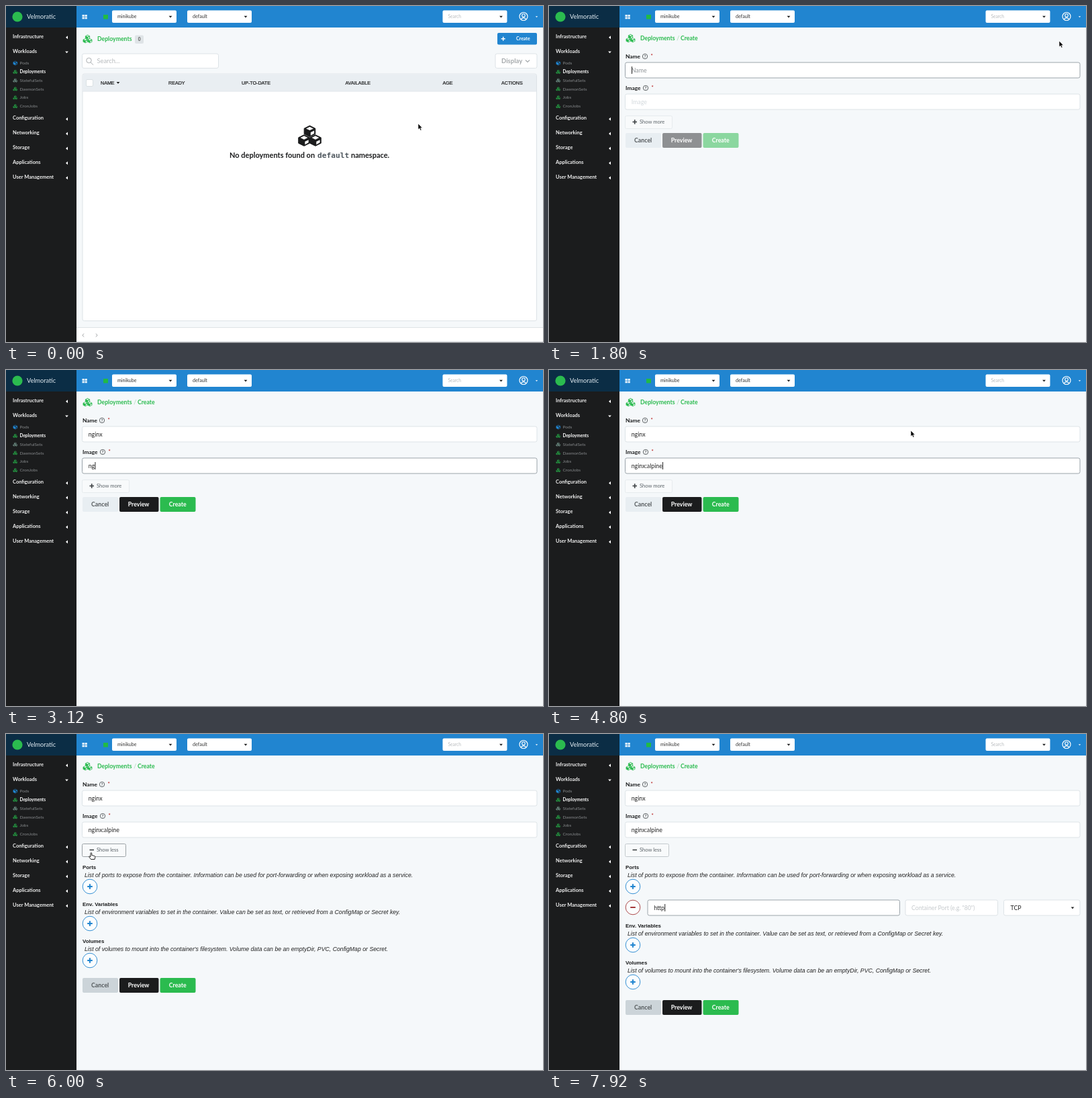
These frames come from a looping animation (800x500 px, 8 s). An HTML page:

```html
<!DOCTYPE html>
<html lang="en">
<head>
<meta charset="utf-8">
<title>Deployments</title>
<style>
  html, body { margin: 0; width: 100%; height: 100%; overflow: hidden; background: #f5f8fa; }
  svg { display: block; width: 800px; height: 500px; }
  text { font-family: Lato, sans-serif; white-space: pre; }
  .sans { font-family: "Liberation Sans", Arial, sans-serif; }
  .mono { font-family: "DejaVu Sans Mono", monospace; }
  .b { font-weight: 700; }
  .i { font-style: italic; }
</style>
</head>
<body>
<svg id="stage" viewBox="0 0 800 500" xmlns="http://www.w3.org/2000/svg"></svg>
<script>
const BLUE = '#2185d0', GREEN = '#2bbb4f', INK = '#1b1c1d';
const LOOP = 8000, STEP = 120;

// drawing helpers; text is placed by its vertical centre
const text = (x, y, str, size, fill = INK, cls = '', extra = '') =>
  `<text x="${x}" y="${(y + size * .35).toFixed(2)}" font-size="${size}" fill="${fill}" class="${cls}" ${extra}>${str}</text>`;
const rect = (x, y, w, h, fill, r = 0, extra = '') =>
  `<rect x="${x}" y="${y}" width="${w}" height="${h}" rx="${r}" fill="${fill}" ${extra}/>`;
const box = (x, y, w, h, extra = '') => rect(x + .5, y + .5, w - 1, h - 1, '#fff', 2.5, `stroke="#dde3e7" ${extra}`);
const path = (d, fill, extra = '') => `<path d="${d}" fill="${fill}" ${extra}/>`;
const line = (d, color, w = 1) => path(d, 'none', `stroke="${color}" stroke-width="${w}"`);
const group = (id, body) => `<g id="${id}">${body}</g>`;
const down = (x, y, color = INK, s = 2.4) => path(`M${x - s} ${y - s / 2}h${2 * s}l${-s} ${s * 1.1}z`, color);
const plus = (x, y, s, color, w) => line(`M${x - s} ${y}h${2 * s}M${x} ${y - s}v${2 * s}`, color, w);

function cube(x, y, s, color, gap) {
  const h = s * .5;
  return path(`M${x} ${y - s}L${x + s} ${y - h}V${y + h}L${x} ${y + s}L${x - s} ${y + h}V${y - h}z`, color,
      `stroke="${color}" stroke-width="${s * .12}" stroke-linejoin="round"`) +
    path(`M${x} ${y - s * .8}l${s * .66} ${s * .32}l${-s * .66} ${s * .32}l${-s * .66} ${-s * .32}z`, gap) +
    path(`M${x + s * .16} ${y + s * .2}l${s * .64} ${-s * .3}v${s * .5}l${-s * .64} ${s * .36}z`, gap);
}
const cubes = (x, y, s, color, gap) =>
  cube(x, y - s * .82, s, color, gap) + cube(x - s * 1.02, y + s * .82, s, color, gap) + cube(x + s * 1.02, y + s * .82, s, color, gap);

function sidebar() {
  let out = rect(0, 0, 105, 500, INK) + rect(0, 0, 105, 32, '#0b2d45') +
    `<circle cx="17" cy="16" r="7.6" fill="${GREEN}"/>` + text(31, 15.5, 'Velmoratic', 9.2, '#e4edf3');
  const heads = [['Infrastructure', 45], ['Workloads', 67], ['Configuration', 166.5], ['Networking', 188.3],
    ['Storage', 210.2], ['Applications', 232], ['User Management', 254]];
  for (const [name, y] of heads) {
    out += text(10, y, name, 7.5, '#f0f0f0', 'b');
    out += name === 'Workloads' ? down(90.5, y + 1.7, '#fff') : path(`M92 ${y - .8}v5l-3 -2.5z`, '#fff');
  }
  ['Pods', 'Deployments', 'StatefulSets', 'DaemonSets', 'Jobs', 'CronJobs'].forEach((name, i) => {
    const y = 85 + i * 12.8, on = i === 1;
    out += i ? cubes(13.8, y, 1.6, i === 2 ? '#6f8f86' : '#27a046', INK) : cube(13.8, y, 3, BLUE, INK);
    out += text(20.5, y, name, 6.5, on ? '#fff' : '#85888a', on ? 'b' : '');
  });
  return out;
}

function topbar() {
  let out = rect(105, 0, 695, 32, BLUE);
  for (const x of [113.5, 117.5]) for (const y of [13, 16.5]) out += rect(x, y, 3.3, 2.8, '#e8f3fb');
  out += rect(145, 13, 7, 6.5, '#21ba45');
  for (const [x, label, color] of [[158, 'minikube', '#333'], [270, 'default', '#333'], [650.5, 'Search', '#b8bcbf']])
    out += rect(x, 6.5, 96, 18.5, '#fff', 2) + text(x + 8, 16, label, label === 'Search' ? 6.6 : 7.1, color) + down(x + 87, 16);
  out += `<circle cx="771" cy="15.5" r="6" fill="none" stroke="#fff" stroke-width="1.2"/>
    <circle cx="771" cy="14" r="2.3" fill="none" stroke="#fff" stroke-width="1.1"/>`;
  return out + line('M767 19.6q4 -4 8 0', '#fff', 1.1) + down(790.5, 16, '#fff', 1.7);
}

function listPage() {
  let out = cubes(121.5, 49, 3.3, GREEN, '#f5f8fa') + text(136, 49.3, 'Deployments', 8.7, GREEN, 'b') +
    rect(192, 43.5, 13, 12.5, '#dfe4e7', 2) + text(196.7, 49.8, '0', 6.6, '#555', 'b');
  out += rect(732, 40, 59, 17.5, BLUE, 2) + group('hover', path('M749.500 40H734q-2 0 -2 2v13.500q0 2 2 2h15.500z', '#1c5d91')) +
    plus(740.7, 48.8, 3, '#fff', 1.5) + text(760, 49, 'Create', 7, '#fff', 'b');
  out += box(113, 70.5, 204, 22.5) + `<circle cx="123.500" cy="81" r="3.700" fill="none" stroke="#a9adb0"/>` +
    line('M126.200 83.800l3.800 4', '#a9adb0') + text(135.5, 81.7, 'Search...', 9.3, '#b5b9bc');
  out += box(728.5, 70.5, 63, 22.5) + text(738, 81.7, 'Display', 9.5, '#a4a8ab', 'b') + line('M774 80.500l3 3l3 -3', '#a4a8ab', 1.2);
  out += box(113.5, 100.5, 677.5, 368.5) + rect(114.5, 101.5, 675.5, 25.5, '#e9eef2') + line('M114 127h676', '#dde3e7', .8) +
    rect(119.5, 109.5, 10, 10, '#fff', 1.5, 'stroke="#d4dade" stroke-width=".8"');
  for (const [x, label] of [[141, 'NAME'], [242, 'READY'], [351, 'UP-TO-DATE'], [505.5, 'AVAILABLE'], [650.5, 'AGE'], [738, 'ACTIONS']])
    out += text(x, 114.2, label, 7.15, INK, 'sans', `stroke="${INK}" stroke-width=".2"`);
  out += down(167, 114.3) + cubes(452.5, 193.2, 8.3, INK, '#fff');
  out += text(333, 222, 'No deployments found on', 11, INK, 'b') + text(464, 222, 'default', 11.2, '#4d565d', 'mono b') +
    text(514, 222, 'namespace.', 11, INK, 'b');
  out += rect(105, 478.5, 695, 21.5, '#fff') + line('M105 478.500h695M105 499.500h695', '#dfe3e6') +
    line('M116 487.500l-2 2.500l2 2.500M134 487.500l2 2.500l-2 2.500', '#8d9194', .8);
  return out;
}

function field(id, x, y, w) {
  return box(x, y, w, 24, `id="${id}Box"`) + text(x + 9.7, y + 12, '', 8.8, INK, '', `id="${id}Text"`) +
    rect(x + 10, y + 6.5, .9, 11, '#111', 0, `id="${id}Caret"`);
}

function label(name, y, x) {
  return text(114, y, name, 8.4, INK, 'b') + `<circle cx="${x}" cy="${y}" r="3.700" fill="none" stroke="#3d4245" stroke-width=".8"/>` +
    text(x, y, '?', 5.8, '#3d4245', 'b', 'text-anchor="middle"') + text(x + 8.5, y - 1, '*', 7.5, '#b82424', 'b');
}

const ring = (y, color) => `<circle cx="125" cy="${y}" r="10.800" fill="#fbfdfe" stroke="${color}" stroke-width=".9"/>`;
const section = (y, name, info) => text(114, y, name, 7.9, INK, 'sans b') + text(117, y + 11.9, info, 8.73, '#222', 'sans i') +
  ring(y + 29, BLUE) + plus(125, y + 29, 3.8, BLUE, 2);

function formPage() {
  let out = cubes(121.5, 48, 3.3, GREEN, '#f5f8fa') + text(136, 48.3, 'Deployments', 8.7, GREEN, 'b') +
    text(190.3, 48.3, '/', 8.7, '#9fd8ae') + text(196, 48.3, 'Create', 8.7, GREEN, 'b');
  out += label('Name', 75, 143) + field('name', 113, 83.5, 678.5) + label('Image', 122, 144) + field('image', 113, 130.5, 678.5);
  out += group('toggle', rect(113.5, 163.5, 70, 19, '#f8fafb', 2, 'id="toggleBox"') +
    line('M124.500 172.500h6.500', '#3d4245', 1.6) + group('toggleBar', line('M127.750 169.200v6.600', '#3d4245', 1.6)) +
    text(135, 172.7, '', 7.55, '#5b6368', '', 'id="toggleText"'));
  out += group('more', section(198, 'Ports', 'List of ports to expose from the container. Information can be used for port-forwarding or when exposing workload as a service.') +
    group('row', ring(258, '#a5383a') + line('M121.200 258h7.600', '#a5383a', 2) + field('port', 146.5, 246.5, 376.5) +
      box(530.5, 246.5, 138.5, 24) + text(540, 258.7, 'Container Port (e.g. "80")', 8.7, '#c6cacd') +
      box(677, 246.5, 114.5, 24) + text(687.5, 258.7, 'TCP', 8.8, '#222') + down(780, 258.7)) +
    group('rest', section(253, 'Env. Variables', 'List of environment variables to set in the container. Value can be set as text, or retrieved from a ConfigMap or Secret key.') +
      section(308, 'Volumes', "List of volumes to mount into the container's filesystem. Volume data can be an emptyDir, PVC, ConfigMap or Secret.")));
  return out + group('actions', rect(114, 189, 53, 22, '#e8eef2', 2, 'id="cancel"') + text(127, 200, 'Cancel', 8.8, '#54595c', 'b') +
    rect(169, 189, 58.5, 22, INK, 2, 'id="preview"') + text(181.7, 200, 'Preview', 8.8, '#fff', 'b') +
    rect(229.5, 189, 53, 22, GREEN, 2, 'id="create"') + text(242.7, 200, 'Create', 8.8, '#fff', 'b'));
}

const cursors = group('arrow', path('M0 0V8.800L2 7L3.500 10.300L5 9.600L3.600 6.400H6.200z', '#000', 'stroke="#fff" stroke-width=".6"')) +
  group('hand', path('M0 .8q.9 -1.300 1.800 0v3.200l4 .9q1.200 .4 1 1.800l-.7 3.300H.5L-2.400 6.200q.2 -1.300 1.500 -.6L0 6.300z',
    '#fff', 'stroke="#111" stroke-width=".9" stroke-linejoin="round"'));

const stage = document.getElementById('stage');
stage.innerHTML = rect(0, 0, 800, 500, '#f5f8fa') + group('list', listPage()) + group('form', formPage()) +
  sidebar() + topbar() + cursors;

const el = {};
for (const node of stage.querySelectorAll('[id]')) el[node.id] = node;
const show = (id, on) => { el[id].style.display = on ? '' : 'none'; };
const set = (id, key, value) => el[id].setAttribute(key, value);
const shift = (id, x, y) => set(id, 'transform', `translate(${x} ${y})`);

// [start, end, from, to, easing]
const inOut = p => p * p * (3 - 2 * p), out = p => 1 - (1 - p) ** 2;
const moves = [
  [120, 1200, [614, 175], [760, 52], inOut],
  [4800, 5640, [539, 90], [126, 176.5], out],
  [6120, 6480, [126, 176.5], [124.5, 226], inOut],
];
const AT = { form: 1800, name: 2160, tab: 2880, image: 3000, tag: 3720, mouse: 4800, open: 5760, row: 6600, port: 7320, type: 7560 };

const typed = (str, start, t) => str.slice(0, Math.max(0, Math.floor((t - start) / STEP) + 1));

function pointer(t) {
  const [a, b, from, to, ease] = moves.filter((m, i) => !i || t >= m[0]).pop();
  const p = ease(Math.min(1, Math.max(0, (t - a) / (b - a))));
  return from.map((v, i) => v + (to[i] - v) * p);
}

function drawField(id, value, hint, focus) {
  const node = el[id + 'Text'];
  node.textContent = value || hint;
  node.setAttribute('fill', value ? '#222' : focus ? '#8f9498' : '#d3d9dd');
  set(id + 'Box', 'stroke', focus ? '#9ba4aa' : '#dde3e7');
  show(id + 'Caret', focus);
  if (focus) shift(id + 'Caret', value ? node.getComputedTextLength() : 0, 0);
}

function draw(t) {
  const form = t >= AT.form, open = t >= AT.open, row = t >= AT.row;
  show('list', !form);
  show('form', form);
  show('more', open);
  show('row', row);
  shift('rest', 0, row ? 32 : 0);
  shift('actions', 0, row ? 207 : open ? 174 : 0);

  const image = typed('nginx', AT.image, t) + typed(':alpine', AT.tag, t);
  drawField('name', typed('nginx', AT.name, t), 'Name', form && t < AT.tab);
  drawField('image', image, 'Image', t >= AT.tab && !open);
  drawField('port', typed('http', AT.type, t), '', t >= AT.port);

  const [x, y] = pointer(t);
  const overToggle = t >= AT.mouse && x < 184 && y > 163 && y < 183;
  const hand = overToggle || t >= AT.open;
  const visible = t < AT.name || (t >= AT.mouse && t < AT.type);
  show('hover', x > 732 && y < 57);
  show('arrow', visible && !hand);
  show('hand', visible && hand);
  shift(hand ? 'hand' : 'arrow', x, y);

  show('toggleBar', !open);
  el.toggleText.textContent = open ? 'Show less' : 'Show more';
  set('toggleBox', 'width', open ? 65 : 70);
  set('toggleBox', 'stroke', overToggle ? '#9ba1a5' : open ? '#c3c9cd' : '#e6ebee');
  set('cancel', 'fill', open ? '#ccd4d9' : '#e8eef2');
  set('preview', 'fill', image ? INK : '#8e9092');
  set('create', 'fill', image ? GREEN : '#8bd79f');
}

const begin = performance.now();
function tick() {
  const t = (performance.now() - begin) % LOOP;
  draw(Math.floor(t / STEP) * STEP);
  requestAnimationFrame(tick);
}
draw(0);
requestAnimationFrame(tick);
</script>
</body>
</html>
```
